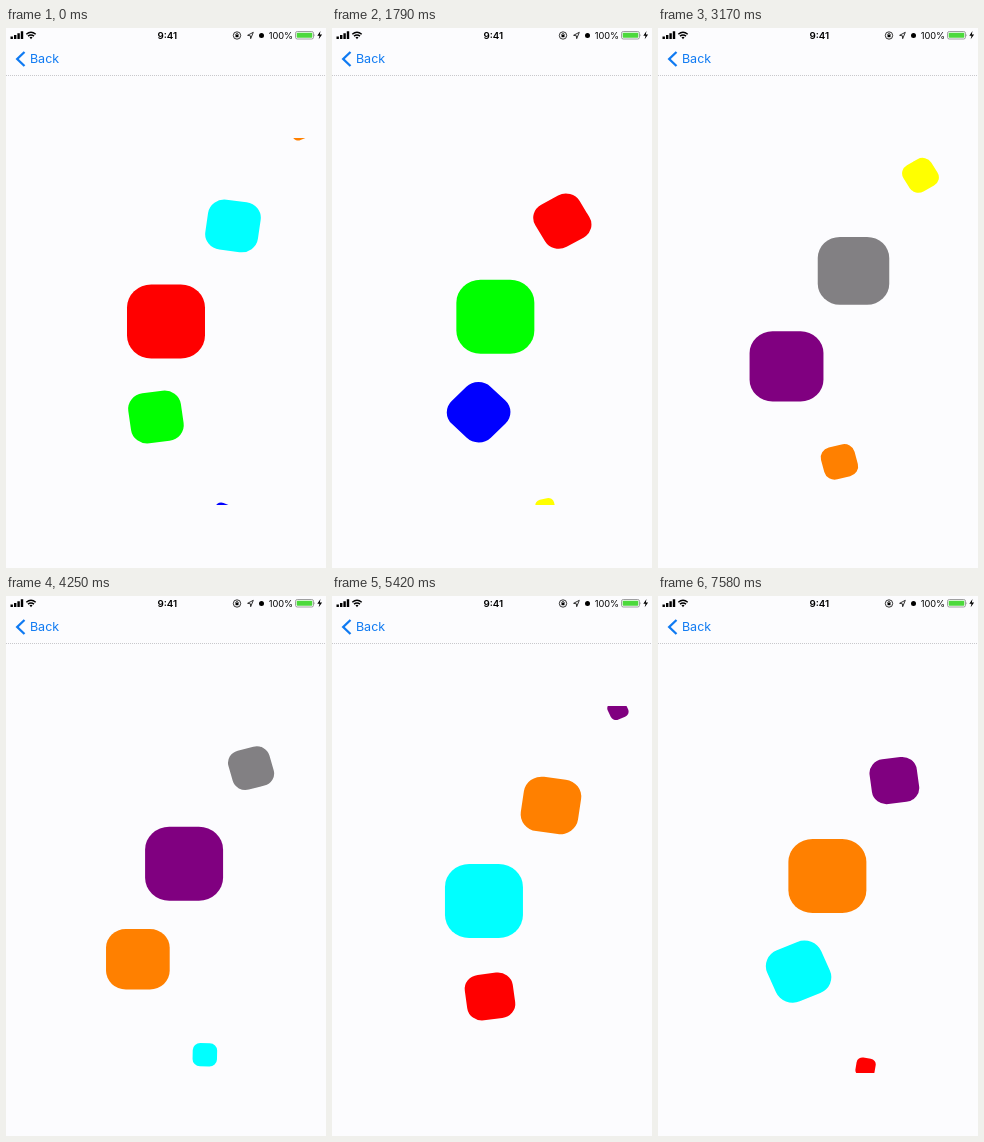
Animation, 320 px wide and 540 px high, one loop 7620 ms. Source, as an HTML page:

```html
<!DOCTYPE html>
<html lang="en">
<head>
<meta charset="utf-8">
<title>Spinning cells</title>
<style>
  html, body { margin: 0; width: 100%; height: 100%; overflow: hidden; background: #fcfcfe; }
  svg { display: block; width: 320px; height: 540px; }
  text { font-family: Inter, Roboto, sans-serif; }
</style>
</head>
<body>
<svg viewBox="0 0 320 540">
  <defs><clipPath id="list"><rect y="110" width="320" height="367"/></clipPath></defs>
  <rect width="320" height="540" fill="#fcfcfe"/>

  <!-- Status bar -->
  <path d="M4.500 8.500h2.400v2.500h-2.400zM8 7h2.400v4h-2.400zM11.400 5.300h2.400v5.700h-2.400zM14.800 3.300h2.400v7.700h-2.400z"/>
  <g fill="none" stroke="#000" stroke-width="1.500">
    <path d="M20.300 6.200q4.700-4 9.400 0M22 8.200q3-2.500 6 0"/>
    <circle cx="231" cy="7.500" r="3.700" stroke-width=".8"/>
    <path d="M229.900 7v-1q1.100-1.200 2.200 0v1" stroke-width=".7"/>
    <path d="M247.300 4.300l-5.700 3 2.800.5.300 2.900z" stroke-width=".8"/>
  </g>
  <path d="M23.500 9.300q1.500-1.200 3 0l-1.500 1.900z"/>
  <rect x="229.500" y="6.800" width="3" height="2.400"/>
  <circle cx="255.500" cy="7.500" r="2.500"/>
  <rect x="289.500" y="3.500" width="18" height="7.500" rx="1.800" fill="none" stroke="#888" stroke-width=".8"/>
  <rect x="290.700" y="4.700" width="15.600" height="5.100" rx=".8" fill="#4cd93c"/>
  <path d="M308.500 6v2.500q1.300-1.200 0-2.500" fill="#888"/>
  <path d="M314.500 3l-3.200 4.700h2.200l-.8 3.500 3.400-4.800h-2.300z"/>

  <!-- Navigation bar -->
  <path d="M18.500 24l-7.300 7 7.300 7" fill="none" stroke="#0f7af2" stroke-width="2.300"/>
  <path d="M0 47.500h320" stroke="#c8c8cc" stroke-dasharray="1 1"/>

  <g transform="scale(.85333 .8096)">
    <text x="189" y="13.700" font-size="11.500" font-weight="600" text-anchor="middle">9:41</text>
    <text x="336.500" y="13.500" font-size="10.800" text-anchor="end">100%</text>
    <text x="28" y="43.800" font-size="14.700" fill="#0f7af2">Back</text>
  </g>

  <g clip-path="url(#list)"><g id="cells" transform="scale(.85333 .8096)"></g></g>
</svg>
<script>
const LOOP = 7620, STEP = 1000 / 24;
const COLORS = ['#f00', '#0f0', '#00f', '#ff0', '#828083', '#800080', '#ff8000', '#0ff'];
// Scroll keys: step, position in cells, speed in cells per second
const KEYS = [
  [1, 0, 0], [43, -6.95, -3.6], [76, -11.47, -5], [102, -18.73, -6.1],
  [130, -25.12, -5.4], [154, -30.424, -6.4], [182, -33.86, -.75]
];
const group = document.getElementById('cells');
const cells = Array.from({ length: 5 }, () =>
  group.appendChild(document.createElementNS('http://www.w3.org/2000/svg', 'rect')));

function scrollAt(n) {
  if (n <= KEYS[0][0]) return 0;
  const k = Math.max(1, KEYS.findIndex(key => n <= key[0]));
  const [n0, p0, v0] = KEYS[k - 1], [n1, p1, v1] = KEYS[k];
  const u = (n - n0) / (n1 - n0), w = 1 - u, sec = (n1 - n0) / 24;
  return p0 * w * w * (1 + 2 * u) + p1 * u * u * (3 - 2 * u)
    + sec * u * w * (v0 * w - v1 * u);
}

function place(cell, index, offset) {
  const dist = Math.abs(offset);
  const x = 187.5 - 78.5 * Math.min(offset, 1.15 - offset);
  const y = 362.5 + 118 * offset;
  const size = Math.max(22.3, Math.min(91.4, 108.2 - 46 * dist));
  const angle = Math.sign(offset) * 752 * Math.max(0, dist - .771);
  const attrs = {
    x: -size / 2, y: -size / 2, width: size, height: size, rx: size * .31,
    fill: COLORS[((index % 8) + 8) % 8],
    transform: `translate(${x} ${y}) rotate(${angle})`
  };
  for (const name in attrs) cell.setAttribute(name, attrs[name]);
}

function draw() {
  const time = performance.now() % LOOP;
  const pos = scrollAt(Math.min(182, Math.floor((time + 5) / STEP)));
  const middle = Math.round(pos);
  cells.forEach((cell, i) => place(cell, middle + i - 2, middle + i - 2 - pos));
  requestAnimationFrame(draw);
}
draw();
</script>
</body>
</html>
```
